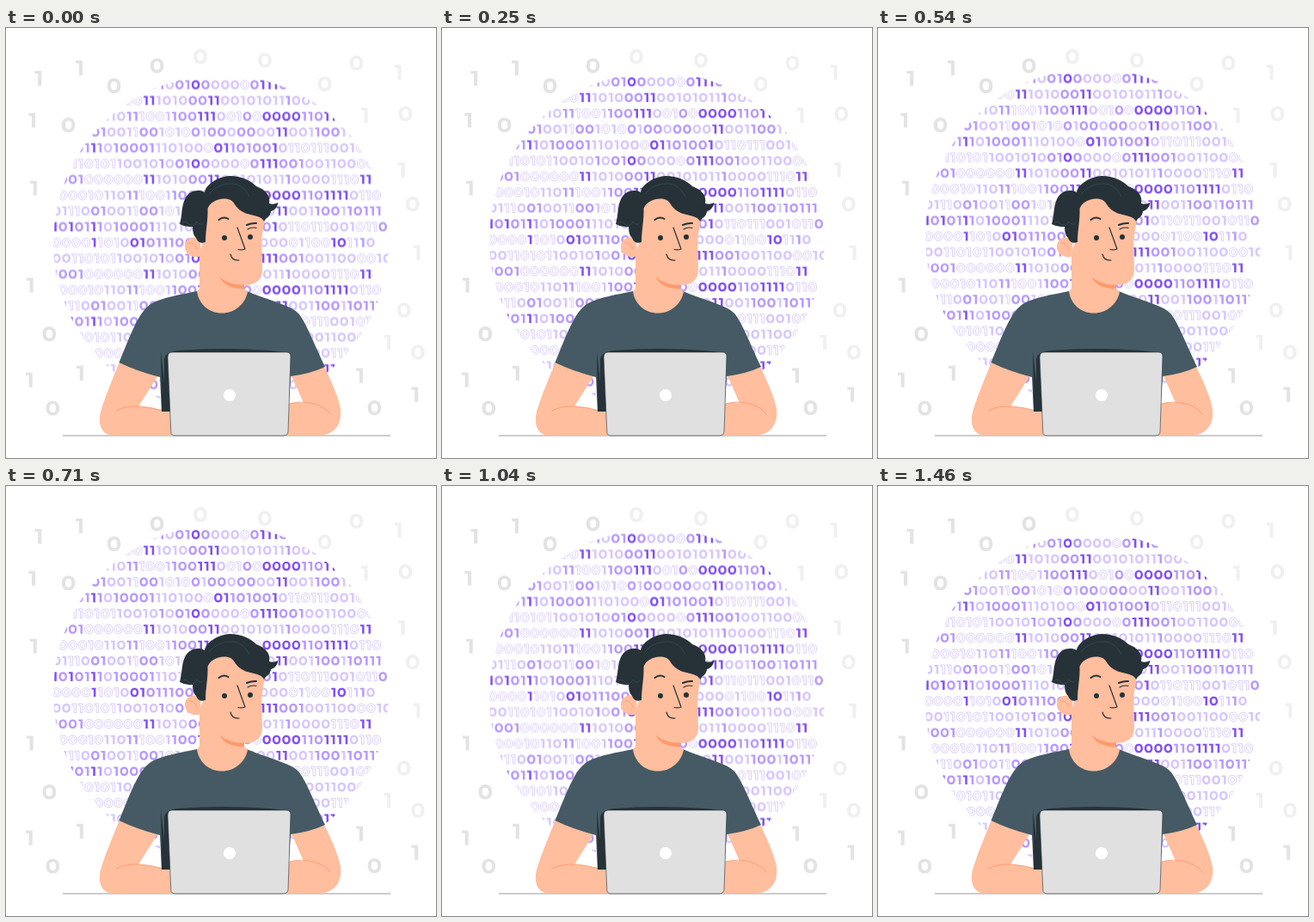
Animation of 500 by 500 pixels, one loop 1.5 s. Source, as an HTML page:

```html
<!DOCTYPE html>
<html lang="en">
<head>
<meta charset="utf-8">
<title>Programmer and binary globe</title>
<style>
  html, body { margin: 0; height: 100%; overflow: hidden; background: #fff; }
  svg { display: block; width: 100%; height: 100%; }
  #globe { animation: float 1.5s -10ms infinite steps(18, start); }
  @keyframes float {
    0%, 100% { transform: translateY(0); }
    50% { transform: translateY(-10px); }
  }
  .strong { fill: #8150f6; }
  .mid { fill: #b79aff; }
  .pale { fill: #d6c7ff; }
  .line { fill: none; stroke: #c3aef8; stroke-width: .6; }
  .skin { fill: #ffbe9d; }
  .shirt { fill: #455a64; }
  .dark { fill: #263238; }
  .ink, .brow { fill: none; stroke: #263238; stroke-width: 1.2; stroke-linecap: round; stroke-linejoin: round; }
  .brow { stroke-width: 2; }
  .fold { fill: none; stroke: #ff9a6c; stroke-width: .9; stroke-linecap: round; }
  .strand { fill: none; stroke: #455a64; stroke-width: .5; }
</style>
</head>
<body>
<svg viewBox="0 0 500 500">
  <defs>
    <path id="d0" fill-rule="evenodd" d="M5 0C8.200 0 10 2.300 10 5.500S8.200 11 5 11 0 8.700 0 5.500 1.800 0 5 0ZM5 2.300C3.400 2.300 2.600 3.500 2.600 5.500S3.400 8.700 5 8.700 7.400 7.500 7.400 5.500 6.600 2.300 5 2.300Z"/>
    <path id="d1" d="M0 0H5V11H2.400V2.100H0Z"/>
    <clipPath id="disc"><circle cx="250" cy="250" r="195"/></clipPath>
  </defs>

  <g id="backdrop"></g>
  <g id="globe"><g id="rows" clip-path="url(#disc)"></g></g>

  <path d="M66 474H447" stroke="#bdbdbd" stroke-width="1.3"/>

  <g id="arms">
    <path class="skin" d="M133 386C124 408 113 434 109.500 449C107 463 112 474 126 474H193V446C182 444 166 441 154 440L178 402Z"/>
    <path class="skin" d="M369 392C378 410 387 430 389 443C391 461 382 473 364 474H326V438C333 435 340 435 346 436L331 402Z"/>
    <path class="fold" d="M128 445Q139 439 156 440Q170 441 182 445"/>
    <path class="fold" d="M330 437Q343 433 358 437Q372 441 377 449"/>
  </g>

  <g id="body">
    <path class="shirt" d="M222 306C203 310 183 313 170 320C155 329 148 349 131.500 389Q152 399 179 406L181 446H328L331 405Q354 402 371 394C359 369 350 345 341 333C334 323 306 317 280 306Z"/>
    <path class="dark" d="M180 376L181 446H193L190 382L327 380Q323 376 306 375Q252 371 200 375Q184 377 184 386V412Z"/>
  </g>

  <g id="head">
    <path class="skin" d="M225 262V303L222 306C224 321 236 331.500 251 331.500C266 331.500 278 321 281 307L277 303V299C291 299 298 292 298 281L297 246L302 216L280 190L235 195L229 250Z"/>
    <path class="skin" d="M226 246C218 240 208 245 208 254C208 263 217 269 227 265Z"/>
    <path class="fold" d="M213 250Q219 249 222 257"/>
    <path fill="#ff9a6c" d="M248.500 289.500C256 296 266 299 277 298.500V303.500C264 303 253 300 248.500 289.500Z"/>
    <path class="dark" d="M202 228C205 218 204 207 208 199C213 189 223 187 231 191C232 183 245 173 260 172C274 172 284 177 291 184C302 188 308 195 306 204Q311 206 316.500 203Q315 211 308 213Q308 218 302 222L300 225C297 217 283 219 274 213C265 208 266 200 258 199C247 197 237 203 234.500 210C235 224 232 235 232 249Q224 252 221 244Q217 241 217 231Q209 232 202 228Z"/>
    <path class="strand" d="M236 193Q246 180 264 181Q276 182 283 196M205 226Q211 224 213 229Q220 231 222 225Q226 231 230 226"/>
    <circle class="dark" cx="254" cy="244" r="3"/>
    <circle class="dark" cx="284" cy="243" r="3"/>
    <path class="brow" d="M247.500 223Q253 218.500 258.500 222M280 229Q286 226.500 291 227"/>
    <path class="ink" d="M281 234Q286 231 291 232.500M269 232Q274 246 278 257Q274 258.500 270 257.500M261 263Q263 271 271 270"/>
  </g>

  <g id="laptop">
    <path fill="#e0e0e0" stroke="#263238" stroke-width=".6" d="M193 377H326Q331 377 331 382L328 470Q327.500 474 323 474H197Q192 474 191.800 470L188 383Q188 377 193 377Z"/>
    <circle cx="260" cy="427" r="7" fill="#fff"/>
  </g>
</svg>

<script>
const NS = 'http://www.w3.org/2000/svg';
const CENTER = 250;
const ADVANCE = [11.4, 7.4];
const TONES = ['mid', 'mid', 'pale', 'pale', 'line'];
const rows = document.getElementById('rows');
const backdrop = document.getElementById('backdrop');

function addDigit(parent, digit, x, y, scale, name, value) {
  const use = document.createElementNS(NS, 'use');
  use.setAttribute('href', '#d' + digit);
  use.setAttribute('transform', `translate(${x} ${y}) scale(${scale})`);
  use.setAttribute(name, value);
  parent.append(use);
}

function seeded(seed) {
  return () => (seed = (seed * 16807) % 2147483647) / 2147483647;
}

// Digits in brackets are strong; the rest take a random tone in short runs.
const lines = [
  '00110101100101001(0)000000(111)0010011000010',
  '1001000000(11)101000(11)00101011100001110(11)',
  '100010110111001100(111)00100(0000)110(1111)0110',
  '01110010011001010010000000(11)001100110111',
  '(1)0(1)01(1)10100011101000(01)10100(1)01101110010110',
  '0000(1)1010(01)0111001001010100001100(10)1110'
];
const EXTRA = lines.length - 1;

function addRow(i) {
  // Five lines repeat, with one extra line across the middle.
  const kind = i === 10 ? EXTRA : (i - (i > 10)) % EXTRA;
  const random = seeded(7919 * (kind + 1));
  let x = 53, tone = 'mid', strong = false;
  for (const c of lines[kind]) {
    if (c === '(' || c === ')') {
      strong = c === '(';
      continue;
    }
    if (random() < 0.5) tone = TONES[Math.floor(random() * TONES.length)];
    addDigit(rows, c, x + 1, 61.2 + 18.35 * i, 0.96, 'class', strong ? 'strong' : tone);
    x += ADVANCE[c];
  }
}
for (let i = 0; i < 21; i++) addRow(i);

// Loose digits sit on an ellipse, by compass angle.
function addLoose(digit, degrees, rx, ry) {
  const a = degrees * Math.PI / 180;
  const x = CENTER + rx * Math.sin(a);
  const y = CENTER - ry * Math.cos(a);
  const fill = x < 200 || y > 400 ? '#e3e3e3' : '#f0f0f0';
  addDigit(backdrop, digit, x - (digit === '1' ? 4 : 8), y - 8.6, 1.56, 'fill', fill);
}

const ring = [226, 241, 257, 287, 309, 327, 341, 354, 13, 32, 47, 67, 78, 93, 111, 122, 135];
ring.forEach((angle, i) => addLoose('10110000001101011'[i], angle, 228, 218));

function addCorner(digits, angle) {
  const mid = (digits.length - 1) / 2;
  [...digits].forEach((d, i) => {
    const r = 286 - 24 * Math.abs(i - mid);
    addLoose(d, angle + 9 * (i - mid), r, r);
  });
}
addCorner('111', 312);
addCorner('010', 46);
addCorner('010', 128);
addCorner('01', 230);
</script>
</body>
</html>
```
